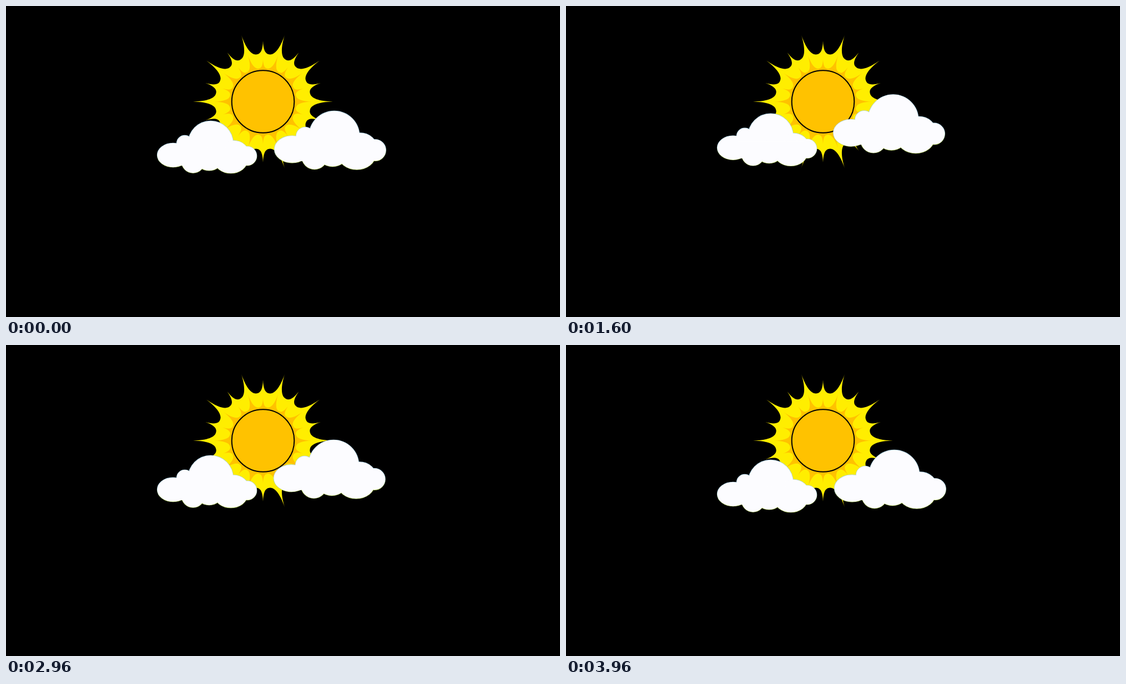
These frames come from a looping animation (998x561 px, 4 s). An HTML page:

```html
<!DOCTYPE html>
<html lang="en">
<head>
<meta charset="utf-8">
<title>Sun and clouds</title>
<style>
  html, body { margin: 0; height: 100%; overflow: hidden; background: #000; }
  svg { display: block; width: 100%; height: 100%; }
  .rim use { fill: none; stroke: url(#rimColor); stroke-width: 1.2; }
</style>
</head>
<body>
<svg viewBox="0 0 998 561">
  <defs>
    <linearGradient id="rimColor" gradientUnits="userSpaceOnUse" x1="0" y1="207" x2="0" y2="302">
      <stop offset=".6" stop-color="#a4cfe6"/>
      <stop offset=".85" stop-color="#b4d25a"/>
    </linearGradient>
    <g id="puffs">
      <ellipse cx="301" cy="269" rx="28.5" ry="21.7"/>
      <circle cx="322" cy="248" r="14.6"/>
      <circle cx="368.7" cy="248" r="40.6"/>
      <ellipse cx="410" cy="268" rx="28" ry="25.3"/>
      <circle cx="434.5" cy="270.5" r="17.2"/>
      <ellipse cx="405" cy="278" rx="30" ry="23.7"/>
      <ellipse cx="366" cy="276" rx="24" ry="20.8"/>
      <circle cx="337" cy="280.5" r="20.7"/>
    </g>
    <g id="cloud">
      <g class="rim"><use href="#puffs"/></g>
      <g fill="#fcfcff">
        <use href="#puffs"/>
        <rect x="310" y="258" width="118" height="30"/>
      </g>
    </g>
  </defs>
  <g transform="translate(463 172.5)">
    <path id="rays" fill="#ffee00"/>
    <path id="innerRays" fill="#ffc200" transform="scale(.7)"/>
    <circle r="56.3" fill="#ffc200" stroke="#000" stroke-width="2"/>
  </g>
  <g id="leftCloud"><use href="#cloud"/></g>
  <g id="rightCloud"><use href="#cloud" transform="translate(483 189) scale(1.12) translate(-272 -207)"/></g>
</svg>
<script>
const LOOP = 4000, TRAVEL = 3940;
const byId = id => document.getElementById(id);

function polar(radius, degrees) {
  const a = degrees * Math.PI / 180;
  return `${(radius * Math.cos(a)).toFixed(2)} ${(radius * Math.sin(a)).toFixed(2)}`;
}

// Alternating long and short spikes joined by round valleys.
function starPath() {
  let d = `M${polar(126, 0)}`;
  for (let angle = 0; angle < 360; angle += 36) {
    const spike = (tip, valley, next, nextRadius) =>
      `C${polar(100, tip + .3)} ${polar(86, valley - 6.3)} ${polar(86, valley)}` +
      `C${polar(86, valley + 5)} ${polar(nextRadius, next - .3)} `;
    d += spike(angle, angle + 10.5, angle + 18, 94) + polar(109.5, angle + 18);
    d += `C${polar(94, angle + 18.3)} ${polar(86, angle + 20.5)} ${polar(86, angle + 25.5)}` +
         `C${polar(86, angle + 31.8)} ${polar(100, angle + 35.7)} ${polar(126, angle + 36)}`;
  }
  return d + 'Z';
}

function draw() {
  const time = Math.min(performance.now() % LOOP, TRAVEL);
  const lift = 1 - Math.abs(2 * time / TRAVEL - 1);
  byId('leftCloud').setAttribute('transform', `translate(0 ${-16.3 * lift})`);
  byId('rightCloud').setAttribute('transform', `translate(${-2.4 * lift} ${-36.4 * lift})`);
  requestAnimationFrame(draw);
}

byId('rays').setAttribute('d', starPath());
byId('innerRays').setAttribute('d', starPath());
draw();
</script>
</body>
</html>
```
